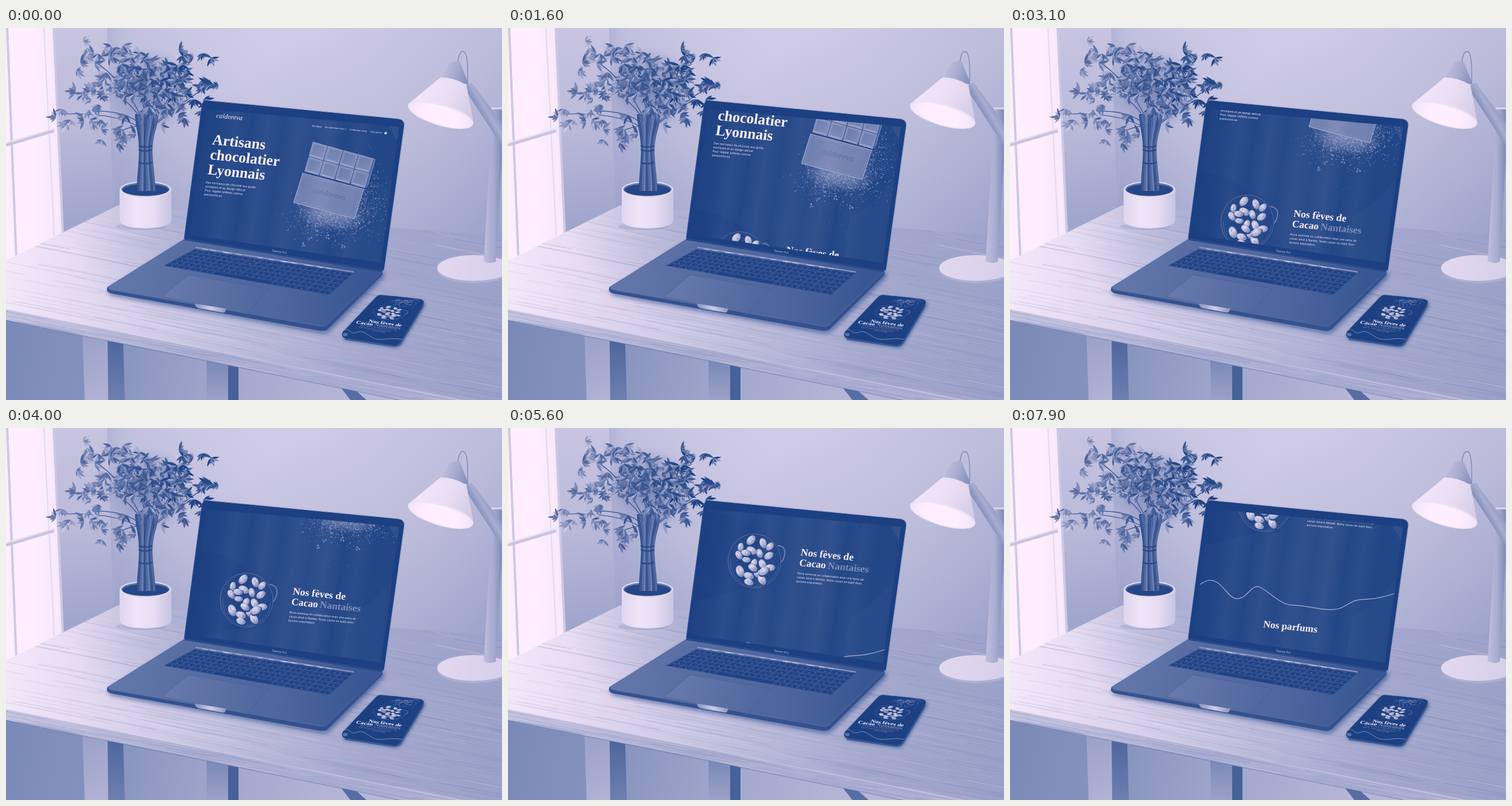
Write an HTML page with a canvas that moves like this. It is 864 px wide and 648 px high and loops after 8 s.

```html
<!DOCTYPE html>
<html lang="fr">
<head>
<meta charset="utf-8">
<style>
html, body { margin: 0; width: 100%; height: 100%; overflow: hidden; }
canvas { display: block; }
</style>
</head>
<body>
<canvas id="stage" width="864" height="648"></canvas>
<script>
const W = 864, H = 648, LOOP = 8000, STEP = 100;
const SERIF = 'bold 1px "Liberation Serif", serif';
const SANS = '1px Inter, "Open Sans", sans-serif';
const SCRIPT = 'italic 1px "Liberation Serif", serif';
const view = document.getElementById('stage').getContext('2d');
let g = view, seed = 1;

// Duotone: 0 is deep blue, 1 is pale pink.
const LOW = [28, 64, 130], HIGH = [254, 238, 255];
const tone = (v, a = 1) =>
  `rgba(${LOW.map((l, i) => Math.round(l + (HIGH[i] - l) * v))},${a})`;
const paint = s => typeof s === 'number' ? tone(s) : s;
const rnd = () => (seed = seed * 16807 % 2147483647) / 2147483647;
const range = (a, b) => a + (b - a) * rnd();
const bell = () => rnd() + rnd() + rnd() + rnd() - 2;

function spread(gr, stops) {
  stops.forEach((s, i) => gr.addColorStop(i / (stops.length - 1), paint(s)));
  return gr;
}
const linear = (x0, y0, x1, y1, ...stops) => spread(g.createLinearGradient(x0, y0, x1, y1), stops);
const radial = (x, y, r, ...stops) => spread(g.createRadialGradient(x, y, 0, x, y, r), stops);

function fill(d, style) {
  g.fillStyle = paint(style);
  g.fill(new Path2D(d));
}
function line(d, style, width = 1) {
  g.strokeStyle = paint(style);
  g.lineWidth = width;
  g.stroke(new Path2D(d));
}
function oval(x, y, rx, ry, style, turn = 0) {
  g.fillStyle = paint(style);
  g.beginPath();
  g.ellipse(x, y, rx, ry, turn, 0, 7);
  g.fill();
}
function inside(d, draw) {
  g.save();
  g.clip(new Path2D(d));
  draw();
  g.restore();
}
function shadowed(blur, dx, dy, draw) {
  g.save();
  g.shadowColor = tone(0, .6);
  g.shadowBlur = blur;
  g.shadowOffsetX = dx;
  g.shadowOffsetY = dy;
  draw();
  g.restore();
}
function text(s, x, y, size, font, style = 1, m = [1, .1, -.15, 1]) {
  g.save();
  g.transform(...m, x, y);
  g.font = font.replace('1px', size + 'px');
  g.fillStyle = paint(style);
  g.fillText(s, 0, 0);
  g.restore();
}

function room() {
  g.fillStyle = linear(190, 330, 560, 0, .56, .7, .78, .81);
  g.fillRect(0, 0, W, H);
  g.fillStyle = linear(500, 0, 864, 350, tone(.6, 0), tone(.63, .5), tone(.5, .8));
  g.fillRect(0, 0, W, H);
  fill('M84 0H176L187 315L96 365Z', linear(100, 0, 140, 340, .76, .7, .58));
  fill('M176 0H215L187 315Z', linear(176, 0, 215, 0, tone(.6, .5), tone(.7, 0)));
  // window
  fill('M0 0H84L100 358L0 410Z', linear(0, 0, 100, 0, 1, 1, .95));
  line('M83 0L99 357', .78, 4);
  line('M66 0L84 362', .88, 2);
  line('M74 0L91 360', .98, 5);
  line('M2 0L18 400', .78, 4);
  line('M0 204L84 179', .76, 5);
  line('M0 200L84 175', .92, 2);
}

function table() {
  fill('M0 500L0 648H740Z', linear(0, 520, 600, 648, .42, .48, .6, .68));
  fill('M133 530H178V648H137Z', linear(133, 540, 178, 648, .56, .66));
  fill('M177 535L204 540L207 648H178Z', linear(0, 545, 0, 648, .22, .36));
  fill('M349 570H388V648H350Z', linear(0, 580, 0, 648, .42, .56));
  fill('M387 575H405V648H387Z', .19);
  fill('M578 620L602 625L628 648H600Z', .26);

  const top = 'M0 405L195 309L864 363V648H790L0 490Z';
  fill(top, linear(0, 430, 850, 500, .96, .84, .7, .6, .56));
  inside(top, () => {
    g.fillStyle = radial(300, 330, 190, tone(.5, .5), tone(.5, 0));
    g.fillRect(0, 290, 500, 250);
    for (let i = 0; i < 520; i++) {
      const x = range(-80, W), y = range(310, H), n = range(50, 230);
      line(`M${x} ${y}q${n / 2} ${n * .09 + range(-3, 3)} ${n} ${n * .2}`,
        tone(rnd() < .55 ? .25 : 1, range(.05, .2)), range(.5, 1.5));
    }
  });
  const edge = 'M0 490L790 648H685L0 509Z';
  fill(edge, linear(0, 500, 700, 648, .74, .62, .64));
  inside(edge, () => {
    for (let i = 0; i < 80; i++) {
      const x = range(-50, 750), y = 491 + x * .201 + range(0, 18);
      line(`M${x} ${y}l110 22`, tone(rnd() < .5 ? .25 : .95, .16), 1);
    }
  });
  line('M0 490L790 648', tone(.9, .7), 1);
  line('M0 509L685 648', tone(.2, .5), 1.2);
}

function leaf(x, y, turn, n, v) {
  g.save();
  g.translate(x, y);
  g.rotate(turn);
  fill(`M0 0Q${n * .4} ${-n * .25} ${n} 0Q${n * .4} ${n * .25} 0 0`, v);
  g.restore();
}

function plant() {
  oval(235, 346, 44, 6, tone(.3, .2));
  fill('M198 281V335Q200 348 243 349Q287 348 288 335V281Z',
    linear(198, 0, 288, 0, .86, .94, .9, .76));
  oval(243, 281, 45, 14, .88);
  oval(243, 281, 42, 12, .3);
  oval(243, 282, 40, 10, .04);
  // each sprig: centre and number of leaf clusters
  const sprigs = [[98, 150, 5], [142, 50, 8], [192, 50, 14], [250, 62, 20], [315, 58, 10],
    [338, 110, 14], [285, 142, 11], [193, 182, 8], [155, 100, 15], [212, 95, 28],
    [275, 95, 30], [150, 145, 10], [240, 125, 20]];
  for (const [x, y] of sprigs) line(`M245 180Q${(x + 290) / 2} ${(y + 140) / 2} ${x} ${y}`, .18, 1.5);
  for (let i = 0; i < 8; i++) {
    const foot = 230 + i * 4, waist = 234 + i * 2.7, tip = 227 + i * 5.2;
    const stem = `M${foot} 284C${foot} 260 ${waist} 240 ${waist} 212S${tip} 170 ${tip} 150`;
    line(stem, .06 + i % 3 * .13, 4.5);
    line(stem, tone(.6, .35), .8);
  }
  for (const y of [205, 212, 234]) line(`M231 ${y}q12 5 24 0`, .04, 2);
  g.fillStyle = radial(248, 108, 75, tone(.12, .5), tone(.12, .25), tone(.12, 0));
  g.fillRect(150, 20, 200, 180);
  for (const [x, y, n] of sprigs) for (let i = 0; i < n; i++) {
    const cx = x + bell() * 32, cy = y + bell() * 22, lean = range(-.3, 3.4);
    const light = (245 - cx) / 900;
    for (let j = 0; j < 6; j++) {
      const v = rnd() < .3 ? range(.4, .62) : range(.06, .36);
      leaf(cx, cy, lean + (j - 2.5) * .42, range(9, 20), Math.max(0, v + light));
    }
  }
}

function lamp() {
  oval(815, 422, 64, 22.5, .64);
  oval(815, 418, 64, 22.5, linear(750, 400, 864, 430, .88, .82));
  fill('M848 139H864V230L853 407Q842 412 832 406Z', linear(836, 0, 862, 0, .7, .62, .46));
  line('M846 140H864', .85, 3);
  line('M787 62Q789 39 797 41Q806 44 804 96', .45, 1.6);
  fill('M797 103L811 95L864 166V206Z', linear(815, 130, 835, 118, .46, .62, .52));
  fill('M770 65Q776 56 790 58L806 98L757 91Z', linear(760, 70, 805, 85, .72, .62, .46));
  fill('M757 86Q780 86 802 99L815 168Q770 120 700 133Z', linear(715, 100, 815, 150, .95, .91, .8));
  oval(757, 151, 59, 19, .93, .29);
  oval(757, 152, 56, 16.5, radial(757, 152, 55, 1, 1, .95), .29);
}

function keyboard() {
  // u runs along a row, v from the hinge to the front
  const at = (u, v) => [328 + 278 * u - (53 - 10 * u) * v, 385 + 42 * u + (29 + 9 * u) * v];
  const quad = (u, v, du, dv) => 'M' + [at(u, v), at(u + du, v), at(u + du, v + dv), at(u, v + dv)].join('L') + 'Z';
  fill(quad(0, 0, 1, 1), .1);
  for (let r = 0; r < 6; r++) {
    for (let k = 0; k < 14; k++) {
      if (r === 5 && k > 3 && k < 9) continue;
      const u = k / 14 + .006, v = r / 6 + .02;
      fill(quad(u, v, .061, .135), .02);
      line(quad(u, v, .061, .135), tone(.35, .35), .5);
      const [x, y] = at(u + .03, v + .07);
      fill(`M${x - 1} ${y}l2.2 .4v.8l-2.2 -.4z`, tone(.85, .6));
    }
  }
  fill(quad(4 / 14 + .006, 5 / 6 + .02, 5 / 14 - .01, .135), .02);
  line('M330 382L606 425', .5, 2);
  for (let i = 0; i < 18; i++) {
    const x = range(340, 560);
    line(`M${x} ${383 + (x - 330) * .155}l9 1.4`, tone(1, .6), 1);
  }
}

function laptop() {
  shadowed(9, 3, 4, () =>
    fill('M310 368L177 451Q173 459 182 462L545 527Q556 529 562 523L656 430L655 420Z', .1));
  fill('M310 368L179 450Q175 455 184 456L546 519Q556 521 561 515L656 423Z',
    linear(200, 440, 620, 470, .31, .25, .22, .13));
  line('M180 456L546 519Q556 521 561 515L656 424', tone(.4, .6), .8);
  fill('M318 430L458 454L418 498L272 468Z', linear(290, 440, 440, 480, .33, .23));
  line('M318 430L458 454L418 498L272 468Z', tone(.08, .5), .7);
  fill('M329 480L384 489L381 495Q378 496 374 495L335 488Q330 486 329 480Z', linear(330, 0, 384, 0, .5, .8, .5));
  keyboard();
  const lid = 'M352 126L684 158Q695 160 694 170L660 418Q658 425 650 423L310 367L341 134Q343 125 352 126Z';
  fill(lid, 0);
  line(lid, tone(.4, .5), 1);
  line('M352 126L684 158Q695 160 694 170L659 422', .62, 1.2);
  line('M311 368L655 424', .06, 3);
  text('Tavinor Pro', 463, 389.5, 4.8, SANS, .85, [1, .15, -.13, 1]);
}

// Beans as offsets from the middle of the bowl.
const BEANS = [-24, -24, -6, -36, 15, -31, 27, -25, -27, -10, -5, -18, 9, -13, 25, -9, -14, -2,
  -25, 18, -1, 4, 14, 6, 27, 12, -10, 26, 4, 21, 13, 33, -10, 37, -3, 12, 16, 18, -15, -14];

function bowl(x, y) {
  g.save();
  g.translate(x, y);
  line('M40 -27Q58 -25 51 -5Q48 3 44 3', .32, 2);
  oval(0, 0, 46, 47, 0);
  line('M-46 0A46 47 0 1 1 46 0A46 47 0 1 1 -46 0', tone(.5, .5), 1);
  line('M-42 -2A42 43 0 0 0 42 4', tone(.5, .35), 1);
  seed = 31;
  for (let i = 0; i < BEANS.length; i += 2) {
    const turn = range(-1.4, 1.4), n = i === 18 ? 10.5 : range(7.5, 10);
    const bx = BEANS[i], by = BEANS[i + 1];
    oval(bx + 1, by + 1.5, n + 1, n * .65 + 1, 0, turn);
    oval(bx, by, n, n * .65, radial(bx - 2, by - 2, n, .9, .75, .45), turn);
    for (let k = 0; k < 7; k++) oval(bx + bell() * 5, by + bell() * 4, 1.4, .5, tone(.25, .55), turn);
  }
  g.restore();
}

function phone() {
  const body = 'M656 465L720 472Q731 474 727 482L688 547Q683 555 672 553L592 541Q582 538 587 529L643 470Q648 464 656 465Z';
  shadowed(6, 2, 3, () => fill(body, 0));
  line(body, tone(.35, .6), 1);
  line('M727 484L688 549Q683 556 672 554L590 542', .12, 2);
  inside(body, () => {
    for (let i = 0; i < 150; i++) oval(694 + bell() * 20, 473 + Math.abs(bell()) * 9, .8, .5, tone(range(.3, .8), .6));
    fill('M672 465L706 469L703 473L673 469Z', 0);
    g.save();
    g.transform(.6, .06, -.08, .26, 667, 496);
    bowl(0, 0);
    g.restore();
    const m = [1, .14, -.3, .66];
    text('Nos fèves de', 631, 512.5, 11, SERIF, 1, m);
    text('Cacao ', 609, 514.5, 11, SERIF, 1, m);
    text('Nantaises', 641, 519, 11, SERIF, .42, m);
    text('Nous sommes en collaboration avec une', 617, 518.5, 3.3, SANS, .6, m);
    text('serre de cacao situé à Nantes. Notre', 614, 521.5, 3.3, SANS, .6, m);
    text('cacao ne subit', 638, 527.5, 3.3, SANS, .6, m);
    line('M585 529C597 517 598 536 611 530S632 540 647 542S672 538 692 543', .5, .9);
    oval(591, 534, 4, 3, tone(.7, .4));
  });
}

function grains(n, x, y, sx, sy, size, low, high) {
  for (let i = 0; i < n; i++)
    oval(x + bell() * sx, y + bell() * sy, range(.3, size), range(.3, size), tone(range(low, high), .65));
}

function powder() {
  seed = 77;
  g.save();
  g.transform(1, .12, 0, .5, 0, 94);
  g.fillStyle = radial(565, 322, 62, tone(.5, .75), tone(.45, .5), tone(.4, 0));
  g.fillRect(500, 255, 130, 130);
  g.restore();
  grains(1500, 566, 328, 52, 30, 1.2, .2, .7);
  grains(350, 628, 285, 22, 50, 1.1, .3, .75);
  grains(420, 600, 302, 60, 68, .9, .4, .9);
  for (const [x, y] of [[587, 381], [540, 352], [517, 378], [561, 362], [530, 367], [612, 341]])
    grains(7, x, y, 3.5, 3.5, 1.5, .45, .85);
}

function chocolate() {
  fill('M534 199L643 229L630 274L520 250Z', .2);
  line('M534 199L643 229L630 274', .5, 1);
  for (let r = 0; r < 2; r++) for (let k = 0; k < 4; k++) {
    g.save();
    g.transform(1, .285, -.3, 1, 543.5 + 26.8 * k - 7.5 * r, 214 + 7.4 * k + 26.5 * r);
    fill('M-12 -12H12V12H-12Z', .42);
    fill('M-12 12L-8 8H8L12 12Z', .52);
    fill('M-9 -9H9V9H-9Z', linear(-9, -9, 9, 9, .32, .4));
    line('M-12 -12H12V12H-12Z', tone(.65, .6), .8);
    g.restore();
  }
  fill('M517 253L623 281L607 332L501 304Z', linear(510, 270, 610, 310, .32, .39, .34));
  line('M517 253L623 281L607 332L501 304Z', .58, 1.2);
  line('M519 257L619 284L604 327L506 301Z', tone(.6, .25), .8);
  text('caldoreva', 535, 287, 14, SCRIPT, .24, [1, .24, -.2, 1]);
}

function page() {
  fill('M270 385C350 378 375 403 400 418C455 425 455 525 395 522C350 512 320 548 270 536Z', tone(0, .8));
  text('caldoreva', 366, 156, 11.5, SCRIPT);
  text('Boutique', 533, 171.8, 4, SANS);
  text('Qui sommes-nous ?', 555, 173.8, 4, SANS);
  text('Contactez-nous', 598, 178.2, 4, SANS);
  text('Connexion', 634.5, 181.9, 4, SANS);
  fill('M659.5 182L663.5 182.4L663 185L659 184.6Z', 1);
  line('M660.6 182q1 -3 2 .2', 1, .7);
  ['Artisans', 'chocolatier', 'Lyonnais'].forEach((s, i) =>
    text(s, 358.5 - 4 * i, 202.5 + 26 * i, 25.6, SERIF));
  ['Des morceaux de chocolat aux goûts', 'exotiques et au design délicat.',
    'Pour régaler enfants comme', 'passionné.es.'].forEach((s, i) =>
    text(s, 348 - i, 270.5 + 6.9 * i, 4.95, SANS));
  powder();
  chocolate();
  bowl(393.5, 470);
  text('Nos fèves de', 473.5, 460.5, 17.6, SERIF);
  text('Cacao ', 471, 478.5, 17.3, SERIF);
  text('Nantaises', 520.5, 483.5, 17.3, SERIF, .42);
  ['Nous sommes en collaboration avec une serre de', 'cacao situé à Nantes. Notre cacao ne subit donc',
    'aucune exportation.'].forEach((s, i) =>
    text(s, 468 - i, 493 + 7 * i, 4.95, SANS));
  line('M270 613C282 610 284 605 294 602C318 598 328 634 345 634S370 609 383 613S420 645 441 645' +
    'S484 653 509 653S538 637 561 635.500S594 634 630 621', .62, 1.2);
  text('Nos parfums', 390, 683.5, 17.2, SERIF);
}

function glare() {
  g.save();
  g.transform(1, 0, -.15, 1, 20, 0);
  g.fillStyle = linear(350, 0, 710, 0, ...[0, .01, .06, .02, .07, .03, .08, .05, .085, .02, .05, .02, .02, 0]
    .map(a => tone(1, a)));
  g.fillRect(300, 120, 460, 320);
  g.restore();
  fill('M673 262Q640 306 595 330L585 410H660Z', tone(1, .018));
  fill('M667 171L686 168L681 196Z', tone(1, .06));
}

const SCREEN = 'M349 141L685 172L653 409L319 360Z';
const still = document.createElement('canvas');
still.width = W;
still.height = H;
g = still.getContext('2d');
room();
table();
lamp();
plant();
laptop();
phone();
g = view;

let shown = -1;
function frame() {
  const step = Math.floor(performance.now() % LOOP / STEP);
  if (step !== shown) {
    shown = step;
    const t = step * STEP / 1000;
    g.drawImage(still, 0, 0);
    inside(SCREEN, () => {
      fill(SCREEN, .015);
      g.save();
      g.translate(6.4 * t, -42.6 * t);
      page();
      g.restore();
      glare();
    });
  }
  requestAnimationFrame(frame);
}
frame();
</script>
</body>
</html>
```
